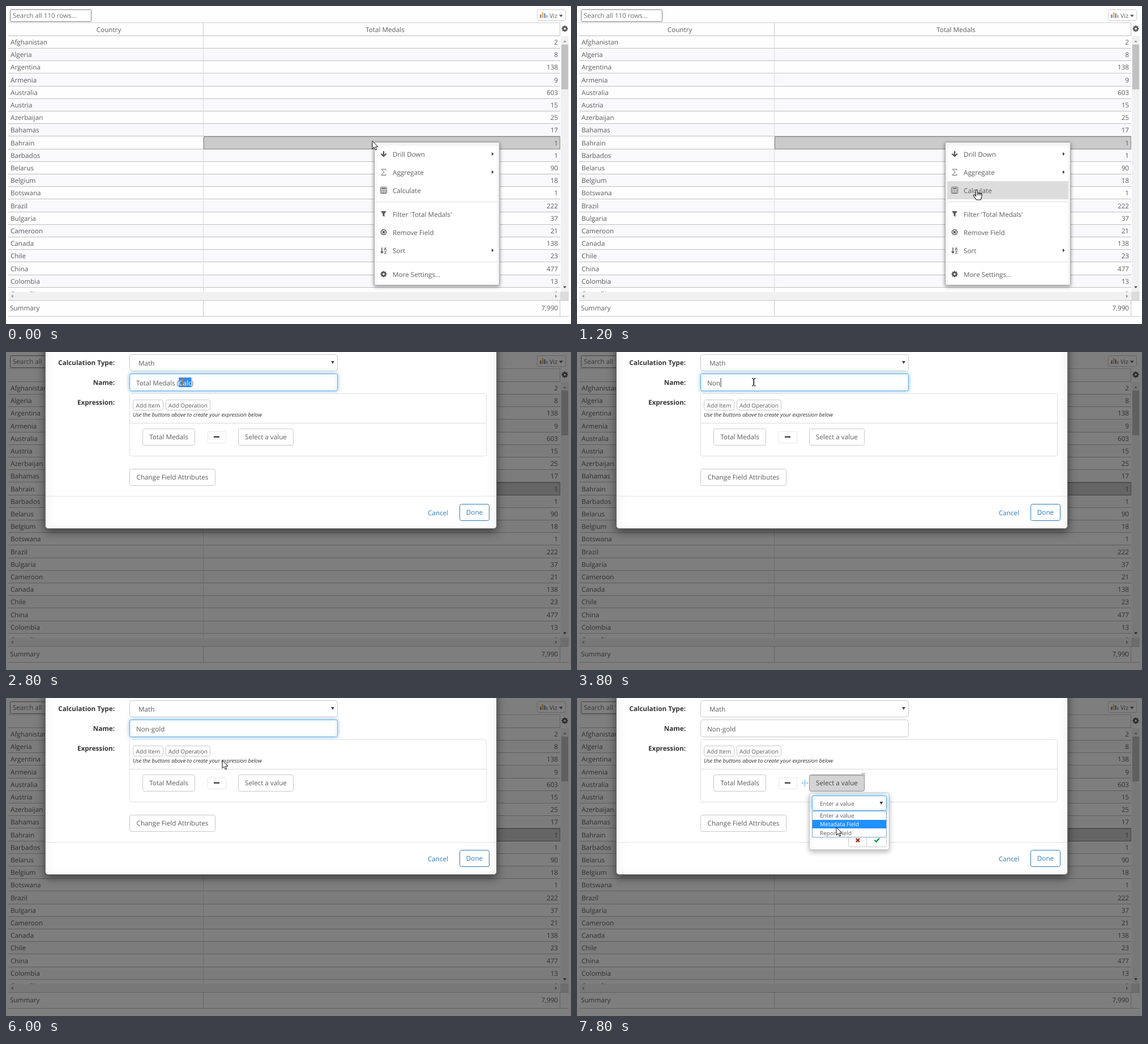
An HTML page with a canvas for the animation above (8 s loop, 998x561 px).

```html
<!DOCTYPE html>
<html lang="en">
<head>
<meta charset="utf-8">
<title>Calculated field</title>
<style>
html, body { margin: 0; width: 100%; height: 100%; overflow: hidden; background: #fefefe; }
canvas { display: block; }
</style>
</head>
<body>
<canvas id="stage" width="998" height="561"></canvas>
<script>
const ctx = document.getElementById('stage').getContext('2d');
const LOOP = 8000, STEP = 200, TAU = Math.PI * 2;
const INK = '#5c5c5c', LINE = '#c6c6c6', BLUE = '#2b7bbb';
const ROW_TOP = 53, ROW_H = 22.2;

const countries = ('Afghanistan Algeria Argentina Armenia Australia Austria Azerbaijan Bahamas Bahrain ' +
  'Barbados Belarus Belgium Botswana Brazil Bulgaria Cameroon Canada Chile China Colombia').split(' ').concat('Costa Rica');
const medals = [2, 8, 138, 9, 603, 15, 25, 17, 1, 1, 90, 18, 1, 222, 37, 21, 138, 23, 477, 13, 2];

const items = [
  { label: 'Drill Down', y: 261, icon: arrowIcon, sub: true },
  { label: 'Aggregate', y: 293, icon: sigmaIcon, sub: true },
  { label: 'Calculate', y: 325, icon: calcIcon },
  { label: "Filter 'Total Medals'", y: 367, icon: funnelIcon },
  { label: 'Remove Field', y: 399, icon: removeIcon },
  { label: 'Sort', y: 431, icon: sortIcon, sub: true },
  { label: 'More Settings...', y: 473, icon: (x, y) => gear(x, y, 5.5) }
];

// Pointer stops: time, x, y
const path = [
  [0, 647, 238], [1200, 706, 324], [1400, 704, 323], [2400, 312, 53],
  [5200, 312, 53], [5400, 326, 76], [5600, 326, 76], [6400, 438, 144],
  [6600, 438, 144], [7200, 500, 186], [7400, 500, 186], [7800, 458, 228]
];

function text(str, x, y, o = {}) {
  ctx.font = `${o.style || ''} ${o.size || 11.7}px "Open Sans", "Noto Sans", sans-serif`;
  ctx.textAlign = o.align || 'left';
  ctx.fillStyle = o.color || INK;
  ctx.fillText(str, x, y);
}

function rect(x, y, w, h, color) {
  ctx.fillStyle = color;
  ctx.fillRect(x, y, w, h);
}

function box(x, y, w, h, r, fill, stroke) {
  ctx.beginPath();
  ctx.roundRect(x + .5, y + .5, w - 1, h - 1, r);
  if (fill) { ctx.fillStyle = fill; ctx.fill(); }
  if (stroke) { ctx.lineWidth = 1; ctx.strokeStyle = stroke; ctx.stroke(); }
}

function shadowed(blur, dy, alpha, draw) {
  ctx.save();
  ctx.shadowColor = `rgba(0,0,0,${alpha})`;
  ctx.shadowBlur = blur;
  ctx.shadowOffsetY = dy;
  draw();
  ctx.restore();
}

function poly(points, fill, stroke) {
  ctx.beginPath();
  points.forEach(([x, y]) => ctx.lineTo(x, y));
  ctx.closePath();
  if (fill) { ctx.fillStyle = fill; ctx.fill(); }
  if (stroke) { ctx.lineWidth = 1; ctx.strokeStyle = stroke; ctx.stroke(); }
}

function stroke(points, color, width) {
  ctx.beginPath();
  points.forEach(([x, y], i) => i ? ctx.lineTo(x, y) : ctx.moveTo(x, y));
  ctx.strokeStyle = color;
  ctx.lineWidth = width;
  ctx.stroke();
}

function cross(x, y, r, color, width) {
  stroke([[x - r, y - r], [x + r, y + r]], color, width);
  stroke([[x - r, y + r], [x + r, y - r]], color, width);
}

const down = (x, y, w, h, color) => poly([[x - w / 2, y], [x + w / 2, y], [x, y + h]], color);
const side = (x, y, dx, h, color) => poly([[x, y - h], [x + dx, y], [x, y + h]], color);

function gear(x, y, r) {
  ctx.save();
  ctx.translate(x, y);
  for (let i = 0; i < 4; i++) {
    rect(-1.2, -r, 2.4, r * 2, '#555');
    ctx.rotate(TAU / 8);
  }
  ctx.beginPath();
  ctx.arc(0, 0, r * .55, 0, TAU);
  ctx.lineWidth = r * .42;
  ctx.strokeStyle = '#555';
  ctx.stroke();
  ctx.beginPath();
  ctx.arc(0, 0, r * .34, 0, TAU);
  ctx.fillStyle = '#fff';
  ctx.fill();
  ctx.restore();
}

function arrowIcon(x, y) {
  stroke([[x, y - 5], [x, y + 4]], '#555', 2.4);
  stroke([[x - 4.8, y - .5], [x, y + 4], [x + 4.8, y - .5]], '#555', 2.2);
}

function sigmaIcon(x, y) {
  stroke([[x + 4, y - 3], [x + 4, y - 5], [x - 4, y - 5], [x + 1, y], [x - 4, y + 5.5], [x + 4, y + 5.5], [x + 4, y + 3.5]], '#666', 1);
}

function calcIcon(x, y) {
  box(x - 6, y - 6, 12, 12, 1, '#f8f8f8', '#555');
  rect(x - 4, y - 4, 8, 2, '#666');
  for (let i = 0; i < 9; i++) rect(x - 4 + i % 3 * 3, y - 1 + Math.floor(i / 3) * 2.2, 2, 1.4, '#666');
}

function funnelIcon(x, y) {
  poly([[x - 5, y - 5], [x + 5, y - 5], [x + 1.5, y - .5], [x + 1.5, y + 5], [x - 1.5, y + 3], [x - 1.5, y - .5]], '#555');
}

function removeIcon(x, y) {
  ctx.beginPath();
  ctx.arc(x, y, 4.6, 0, TAU);
  ctx.lineWidth = 1.5;
  ctx.strokeStyle = '#555';
  ctx.stroke();
  cross(x, y, 2, '#555', 1.8);
}

function sortIcon(x, y) {
  stroke([[x - 3, y - 5], [x - 3, y + 4]], '#555', 1.5);
  down(x - 3, y + 2, 6, 4, '#555');
  text('A', x + 3, y, { size: 7, align: 'center', style: 'bold' });
  text('Z', x + 3, y + 6, { size: 7, align: 'center', style: 'bold' });
}

function drawTable() {
  rect(0, 0, 998, 561, '#fefefe');
  box(7, 6, 144, 22, 2, '#fff', '#808080');
  text('Search all 110 rows...', 12, 21, { size: 11.6, color: '#707070' });
  box(938, 6, 51, 20, 3, '#fff', '#ccc');
  [['#9b7fc4', 6], ['#efb54d', 10], ['#5a9fd4', 8], ['#e39a9f', 5]]
    .forEach(([c, h], i) => rect(943 + i * 3.6, 21 - h, 2.6, h, c));
  text('Viz', 960, 20.5, { size: 10.5 });
  down(980.3, 15.5, 7, 4, '#555');

  rect(4, 29, 975, 1, '#d0d0d0');
  text('Country', 181.5, 45.5, { align: 'center' });
  text('Total Medals', 669.5, 45.5, { align: 'center' });
  rect(4, 52, 975, 1, '#bcbcbc');
  gear(987, 40, 5.5);

  ctx.save();
  ctx.beginPath();
  ctx.rect(0, 53, 980, 452);
  ctx.clip();
  countries.forEach((name, i) => {
    const y = Math.round(ROW_TOP + i * ROW_H);
    rect(4, y, 975, 22, i % 2 ? '#f9f9fc' : '#fefefe');
    rect(4, y + 21, 975, 1, '#bebebe');
    rect(348, y, 1, 22, '#d8d8d8');
    if (i === 8) box(349, y - 1, 630, 23, 0, '#cbcbcb', '#858585');
    text(name, 8, y + 15);
    text(medals[i], 975, y + 15, { align: 'right' });
  });
  ctx.restore();
  rect(348, 30, 1, 22, LINE);
  rect(978, 30, 1, 22, LINE);

  rect(980, 53, 14, 451, '#f1f1f4');
  rect(981, 68, 12, 79, '#c1c1c1');
  poly([[984, 64], [990, 64], [987, 60.5]], '#a0a0a0');
  down(987, 494.5, 6, 3.5, '#444');
  rect(4, 504.5, 975, 14.5, '#f1f1f1');
  rect(979, 504, 15, 15, '#dcdcdc');
  side(12.5, 512, -3.5, 3, '#999');
  side(970, 512, 3.5, 3, '#999');
  rect(4, 519, 990, 1, LINE);
  rect(348, 520, 1, 27, LINE);
  rect(978, 520, 1, 27, LINE);
  text('Summary', 7, 537);
  text('7,990', 975, 537, { align: 'right' });
  rect(4, 547, 990, 1, LINE);
}

function drawMenu(y, h, shift, hover) {
  shadowed(6, 2, .4, () => box(650, y, 222, h, 2, '#fff', '#a8a8a8'));
  ctx.save();
  ctx.beginPath();
  ctx.rect(651, y + 1, 220, h - 2);
  ctx.clip();
  ctx.translate(0, shift);
  items.forEach((item, i) => {
    if (i === hover) rect(654, item.y - 16, 214, 32, '#dcdcdc');
    item.icon(667, item.y);
    text(item.label, 683, item.y + 4.5);
    if (item.sub) side(858, item.y, 3.5, 3, '#333');
  });
  rect(654, 345, 214, 1, '#e2e2e2');
  rect(654, 451, 214, 1, '#e2e2e2');
  ctx.restore();
}

function focusBox(x, y, w, h) {
  ctx.save();
  ctx.shadowColor = 'rgba(102,175,233,.8)';
  ctx.shadowBlur = 6;
  box(x, y, w, h, 3, '#fff', '#66afe9');
  ctx.restore();
}

function button(x, y, w, h, label, o = {}) {
  box(x, y, w, h, 3, o.fill || '#fff', o.border || '#c8c8c8');
  text(label, x + w / 2, y + h / 2 + (o.size ? 4 : 4.3), { align: 'center', color: o.color, size: o.size });
}

function nameValue(t) {
  return t < 3400 ? 'Total Medals (Calc)' : 'Non-gold'.slice(0, (t - 3400) / STEP + 1);
}

function drawName(t) {
  const focus = t >= 2600 && t < 6400, value = nameValue(t);
  if (focus) focusBox(218, 38, 368, 31);
  else box(218, 38, 368, 31, 4, '#fff', '#c8c8c8');
  text(value, 230, 58.5);
  if (!focus) return;
  if (t >= 2800 && t < 3400) {
    const from = t < 3000 ? value.indexOf('Calc') : 0;
    const part = t < 3000 ? 'Calc' : value;
    const x = 230 + ctx.measureText(value.slice(0, from)).width;
    rect(x, 45, ctx.measureText(part).width, 17, '#2f8cf5');
    text(part, x, 58.5, { color: '#fff' });
  } else if (t < 5400) {
    rect(230 + ctx.measureText(value).width + .5, 46, 1, 16, '#333');
  }
}

function drawDialog(t, p) {
  shadowed(15, 5, .5, () => box(69, -20, 798, 332, 5, '#fff', '#707070'));
  const label = { align: 'right', style: 'bold', color: '#333' };
  text('Calculation Type:', 192, 23, label);
  text('Name:', 192, 58, label);
  text('Expression:', 192, 92.5, label);
  box(218, 4, 368, 30, 4, '#fff', '#c8c8c8');
  text('Math', 234, 24);
  down(577, 16, 6, 5, '#444');
  drawName(t);

  box(218, 73, 631, 111, 3, '#fff', '#ddd');
  rect(219, 125, 629, 1, '#d8d8d8');
  button(224, 84, 54, 19, 'Add Item', { size: 10.1 });
  button(282, 84, 79, 19, 'Add Operation', { size: 10.1 });
  text('Use the buttons above to create your expression below', 224, 113.5, { size: 9.55, style: 'italic', color: '#333' });
  button(241, 135, 93, 30, 'Total Medals');
  box(356, 140, 33, 21, 2, '#fff', '#e8e8e8');
  rect(367, 148.5, 10, 2.5, '#444');

  const open = t >= 6400, hover = !open && overValue(p);
  button(410, 135, 98, 30, 'Select a value',
    open ? { fill: '#d4d4d4', border: '#8c8c8c', color: '#444' } : hover ? { fill: '#e6e6e6', border: '#adadad' } : {});
  if (open) {
    rect(412, 136, 94, 1, '#bcbcbc');
    rect(412, 137, 94, 1, '#c9c9c9');
  }
  if (open || hover) {
    const c = '#a5d2ee';
    stroke([[397, 150], [408, 150]], c, 1.6);
    stroke([[402.5, 144.5], [402.5, 155.5]], c, 1.6);
    for (let i = 0; i < 4; i++) {
      ctx.save();
      ctx.translate(402.5, 150);
      ctx.rotate(i * TAU / 4);
      side(3.8, 0, 2.5, 2.5, c);
      ctx.restore();
    }
    cross(506, 135, 3, '#bbb', 2);
  }

  button(218, 206, 152, 30, 'Change Field Attributes');
  rect(70, 254, 796, 1, '#e5e5e5');
  text('Cancel', 745, 287.5, { color: BLUE });
  button(801, 268, 53, 30, 'Done', { color: BLUE, border: BLUE });
  if (open) drawPopover(t, p);
}

function drawPopover(t, p) {
  shadowed(8, 4, .25, () => box(410, 167, 142, 101, 3, '#fff', '#c4c4c4'));
  const listed = t >= 7400, small = { size: 10 };
  if (listed) focusBox(415, 172, 132, 27);
  else box(415, 172, 132, 27, 3, '#fff', '#ccc');
  text('Enter a value', 429, 190, small);
  down(537.5, 183, 6, 5, '#333');
  box(415, 203, 132, 31, 3, '#fff', '#ccc');
  box(479, 238, 68, 25, 3, '#fff', '#ccc');
  rect(511, 239, 1, 23, '#ccc');
  cross(496, 251, 3.2, '#a8322d', 2.4);
  stroke([[525.5, 250.5], [528.5, 253.5], [534, 247.5]], '#0c9a4c', 2.4);
  if (!listed) return;

  box(415, 199, 132, 47, 0, '#fff', '#7da2c8');
  const pick = p.y < 215 ? 0 : 1;
  rect(416, 200 + pick * 15, 130, 15, '#1e90ff');
  ['Enter a value', 'Metadata Field', 'Report Field'].forEach((s, i) =>
    text(s, 429, 211.3 + i * 15.1, { size: 10, color: i === pick ? '#fff' : INK }));
}

const inside = (p, x, y, w, h) => p.x >= x && p.x <= x + w && p.y >= y && p.y <= y + h;
const overValue = p => inside(p, 410, 135, 98, 30);

function pointer(t) {
  const next = path.findIndex(k => k[0] > t);
  if (next < 0) return { x: 458, y: 228 };
  const [t0, x0, y0] = path[next - 1], [t1, x1, y1] = path[next];
  const u = (t - t0) / (t1 - t0), e = u * u * (3 - 2 * u);
  return { x: Math.round(x0 + (x1 - x0) * e), y: Math.round(y0 + (y1 - y0) * e) };
}

function drawArrow() {
  poly([[0, 0], [0, 14], [3.2, 11], [5.6, 16], [7.8, 15], [5.6, 10.3], [10, 10.3]], '#fff', '#111');
}

function drawHand() {
  ctx.beginPath();
  ctx.moveTo(-1.5, 11);
  ctx.lineTo(-1.5, 1.5);
  ctx.quadraticCurveTo(0, -1.5, 1.5, 1.5);
  ctx.lineTo(1.5, 6);
  for (const x of [4.2, 6.8, 9]) ctx.quadraticCurveTo(x - 1, 4.6 + x * .12, x, 7);
  ctx.lineTo(9, 12);
  ctx.lineTo(7.2, 18);
  ctx.lineTo(-.5, 18);
  ctx.lineTo(-5.5, 11);
  ctx.quadraticCurveTo(-5.5, 8.5, -3.5, 9);
  ctx.closePath();
  ctx.fillStyle = '#fff';
  ctx.fill();
  ctx.strokeStyle = '#111';
  ctx.lineWidth = 1.1;
  ctx.stroke();
  for (const x of [1.5, 4.2, 6.8]) stroke([[x, 6], [x, 10]], '#111', 1);
}

function drawBeam() {
  ctx.globalCompositeOperation = 'difference';
  rect(-.5, -6, 1.5, 12, '#fff');
  for (const y of [-7, 6]) {
    rect(-3, y, 2.5, 1.2, '#fff');
    rect(1, y, 2.5, 1.2, '#fff');
  }
}

function drawPointer(t, p, hover) {
  const beam = t >= 1600 && t < 6800 && inside(p, 218, 38, 368, 31);
  const hand = hover >= 0 || (t >= 1600 && t < 7200 &&
    (overValue(p) || inside(p, 241, 135, 93, 30) || inside(p, 282, 84, 79, 19)));
  ctx.save();
  ctx.translate(p.x, p.y);
  (beam ? drawBeam : hand ? drawHand : drawArrow)();
  ctx.restore();
}

function draw(t) {
  const p = pointer(t);
  const hover = t < 1400 ? items.findIndex(i => inside(p, 654, i.y - 16, 214, 32)) : -1;
  drawTable();
  if (t < 1400) {
    drawMenu(240, 253, 0, hover);
  } else {
    rect(0, 0, 998, 561, 'rgba(0,0,0,.5)');
    drawDialog(t, p);
    if (t < 1600) drawMenu(238, 87, -4.5, 2);
  }
  drawPointer(t, p, hover);
}

ctx.textRendering = 'geometricPrecision';
const start = performance.now();
function tick() {
  const t = (performance.now() - start) % LOOP;
  draw(Math.floor(t / STEP) * STEP);
  requestAnimationFrame(tick);
}
tick();
</script>
</body>
</html>
```
